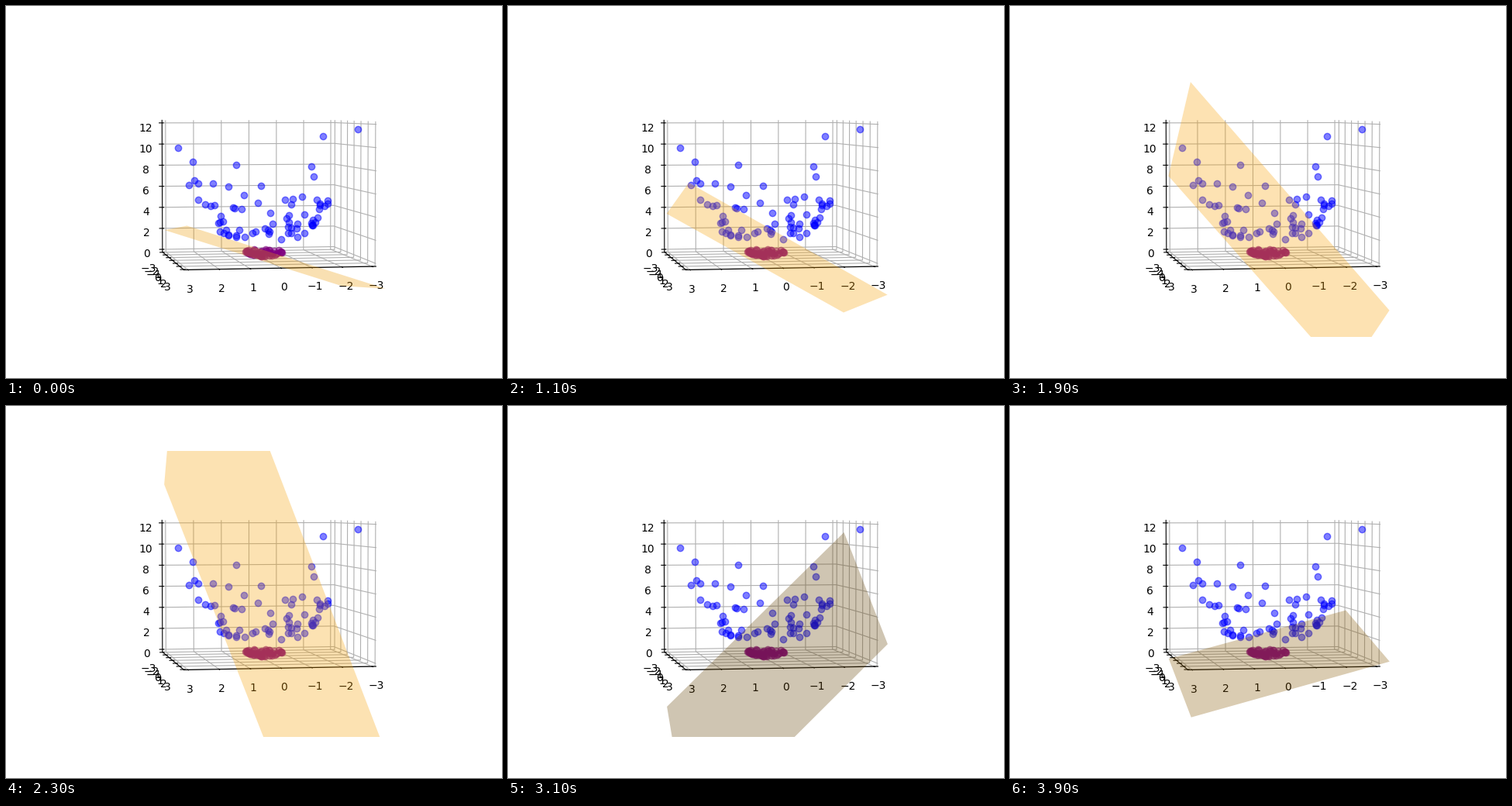
A matplotlib script that plays this animation: 640 px wide and 480 px high, repeating every 4000 ms.

```python
import numpy as np
import matplotlib.pyplot as plt
from matplotlib.animation import FuncAnimation

FRAMES, INTERVAL = 40, 100

# Tilt of the plane's normal in degrees at a few key times
KEY_TIMES = np.array([0, 7, 15, 23, 27, 31, 36, 39])
KEY_TILTS = np.array([-47.5, -37.7, -24.6, -7.56, 3.45, 18.7, 40.4, 49.2])

# Isolated high points of the outer class, as x and z in the slice y = 0
HIGH = [(2.93, 9.85), (2.43, 8.59), (2.38, 6.93), (2.25, 6.64), (2.57, 6.51),
        (1.75, 6.63), (1.23, 6.34), (.96, 8.29), (.11, 6.38), (.69, 5.55),
        (-2.04, 10.85), (-3.26, 11.48), (-1.64, 8.1), (-1.72, 7.19), (-.99, 5.16)]

rng = np.random.default_rng(4)
fig = plt.figure(figsize=(6.4, 4.8), dpi=100)
ax = fig.add_subplot(111, projection="3d")
ax.view_init(elev=3, azim=80)
ax.set_xticks(range(-3, 4))
ax.set_yticks(range(-3, 4))
ax.set_zticks(range(0, 13, 2))
ax.set_xlim(-3.125, 3.125)
ax.set_ylim(-3.125, 3.125)
ax.set_zlim(-.25, 12.25)
for axis in (ax.xaxis, ax.yaxis, ax.zaxis):
    axis.set_pane_color((1, 1, 1, 0))


def bowl(count, r_min, r_max, power):
    """Random points on z = x^2 + y^2 between two radii."""
    r = r_min + (r_max - r_min) * rng.random(count) ** power
    phi = 2 * np.pi * rng.random(count)
    return r * np.cos(phi), r * np.sin(phi), r ** 2


def dots(x, y, z, color):
    ax.plot(x, y, z, "o", color=color, alpha=.5)


def tilt_at(t):
    """Cubic Hermite curve through the key tilts."""
    slopes = np.gradient(KEY_TILTS, KEY_TIMES, edge_order=2)
    i = min(np.searchsorted(KEY_TIMES, t, side="right"), len(KEY_TIMES) - 1) - 1
    h = KEY_TIMES[i + 1] - KEY_TIMES[i]
    s = (t - KEY_TIMES[i]) / h
    return ((1 + 2 * s) * (1 - s) ** 2 * KEY_TILTS[i]
            + s * (1 - s) ** 2 * h * slopes[i]
            + s * s * (3 - 2 * s) * KEY_TILTS[i + 1]
            + s * s * (s - 1) * h * slopes[i + 1])


def plane_height(x, y, t):
    """The normal swings along a great circle while the offset rises and falls."""
    tilt = np.radians(tilt_at(t))
    heading = np.radians(26.8 + 9.2 * np.tan(tilt))
    offset = .71 * np.cos(1.62 * (tilt - np.radians(9)))
    along = x * np.cos(heading) + y * np.sin(heading)
    return -(np.cos(tilt) * along + offset) / np.sin(tilt)


high_x, high_z = np.transpose(HIGH)
ring = bowl(59, 1.33, 2.28, 1.5)
dots(*np.hstack([ring, [high_x, 0 * high_x, high_z]]), "blue")
dots(*bowl(55, 0, .68, .55), "purple")

grid_x, grid_y = np.meshgrid([-3.4, 3.05], [-3.05, 3.3])
surface = None


def update(frame):
    global surface
    if surface is not None:
        surface.remove()
    surface = ax.plot_surface(grid_x, grid_y, plane_height(grid_x, grid_y, frame),
                              color="orange", alpha=.3, linewidth=0)
    return [surface]


anim = FuncAnimation(fig, update, frames=FRAMES, interval=INTERVAL,
                     repeat=True, repeat_delay=0, blit=False)
plt.show()
```
